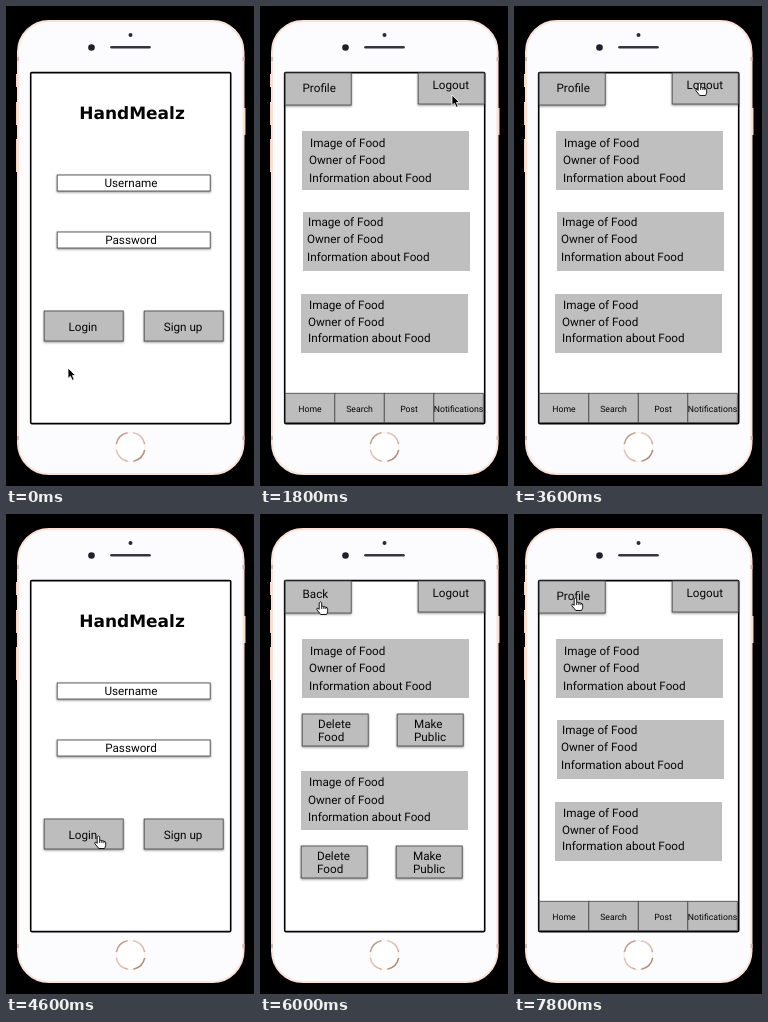
An HTML page for the animation above (8000 ms loop, 248 by 480 pixels).

```html
<!DOCTYPE html>
<html lang="en">
<head>
<meta charset="utf-8">
<title>Food sharing prototype</title>
<style>
  html, body { margin: 0; width: 100%; height: 100%; overflow: hidden; background: #000; }
  svg { display: block; width: 100%; height: 100%; }
  text { font: 11.7px Roboto, sans-serif; fill: #050505; text-rendering: geometricPrecision; }
  .title { font: bold 17px "DejaVu Sans", sans-serif; }
  .nav { font-size: 8.7px; }
  .middle { text-anchor: middle; }
  .raised { stroke: #505050; stroke-width: .9; filter: drop-shadow(0 1px .8px rgba(0, 0, 0, .45)); }
</style>
</head>
<body>
<svg viewBox="0 0 248 480">
  <defs>
    <linearGradient id="ring" x1="0" y1="0" x2="1" y2="1">
      <stop offset="0" stop-color="#a87c68"/>
      <stop offset=".35" stop-color="#e2c6ba"/>
      <stop offset=".6" stop-color="#dcbcae"/>
      <stop offset="1" stop-color="#94694f"/>
    </linearGradient>
  </defs>
  <rect width="248" height="480"/>

  <path d="M11 68v13M11 96v23M11 133v33M238.500 102v27" stroke="#f3d3c7" stroke-width="2"/>
  <rect x="12" y="15" width="225.500" height="453" rx="31" fill="#fcfbfd" stroke="#fbe2d8" stroke-width="2"/>
  <path d="M12 51v4M237.500 51v4M12 430v4M237.500 430v4" stroke="#d9b9ac" stroke-width="2"/>
  <circle cx="124.500" cy="29" r="2" fill="#2c2930"/>
  <circle cx="85.500" cy="41.500" r="3.300" fill="#20202c"/>
  <path d="M105.500 41.300h38" stroke="#37343a" stroke-width="2.600" stroke-linecap="round"/>
  <circle cx="124.500" cy="441" r="14.500" fill="#fff" stroke="#f6efec"/>
  <circle cx="124.500" cy="441" r="14.500" fill="none" stroke="url(#ring)" stroke-width="1.600"
    pathLength="360" stroke-dasharray="66 24" stroke-dashoffset="-12"/>
  <rect x="24.700" y="66.600" width="200" height="351" fill="#fff" stroke="#000" stroke-width="1.600" rx="1"/>

  <g id="login"></g>
  <g id="feed"></g>
  <g id="profile"></g>

  <g id="cursor">
    <path id="arrow" d="M0 0V10.500L2.400 8.300L4.300 12.300L6.200 11.400L4.400 7.500H7.600Z" fill="#000" stroke="#fff" stroke-width=".8"/>
    <path id="hand" d="M-1.300 .8Q0 -.8 1.200 .8V4.500Q2.400 3.600 3.400 4.900Q4.600 4.200 5.400 5.400Q7 5 7.200 6.800V9.200Q7 11 6 12.500H.2Q-1.500 10 -3.600 7.800Q-4.200 6.200 -2.600 6.200L-1.300 7.400ZM1.200 4.500V7M3.400 5V7M5.400 5.500V7.200" fill="#fff" stroke="#000" stroke-width=".9" stroke-linejoin="round"/>
  </g>
</svg>
<script>
const byId = id => document.getElementById(id);

const box = (x, y, w, h, fill, extra = '') =>
  `<rect x="${x}" y="${y}" width="${w}" height="${h}" fill="${fill}" ${extra}/>`;
const label = (x, midY, words, style = '') =>
  `<text x="${x}" y="${midY + 4}" class="${style}">${words}</text>`;
const raised = (x, y, w, h, fill) =>
  box(x + .2, y, w - 1, h - 1, fill, 'class="raised"');

const field = (y, words) => raised(51, y, 154, 17, '#fff') + label(125, y + 8, words, 'middle');
const button = (x, y, w, h, lines, textX, textY) =>
  raised(x, y, w, h, '#bdbdbd') +
  lines.map((line, i) => label(textX, textY + 13 * i, line)).join('');
const card = (x, y, textX, rows) =>
  box(x, y, 167, 59, '#bfbfbf') +
  ['Image of Food', 'Owner of Food', 'Information about Food']
    .map((line, i) => label(textX + (i ? 0 : 1), rows[i], line)).join('');
const actions = (x, y) =>
  button(x, y, 67, 33, ['Delete', 'Food'], x + 16, y + 9.5) +
  button(x + 95, y, 67, 33, ['Make', 'Public'], x + 112, y + 9.5);

const topBar = (words, textY) =>
  button(25, 67, 67, 33, [words], 42.5, textY) +
  button(158, 67, 67, 32, ['Logout'], 172.5, 79);
const firstCard = card(42, 125, 49, [136.5, 154, 171.5]);
const navBar = ['Home', 'Search', 'Post', 'Notifications'].map((words, i) => {
  const x = 25 + i * 49.5;
  return box(x + .3, 387.3, 49.5, 29.3, '#bdbdbd', 'stroke="#505050" stroke-width=".9"') +
    label(x + 25, 401.5, words, 'nav middle');
}).join('');

byId('login').innerHTML =
  label(126, 109, 'HandMealz', 'title middle') +
  field(169, 'Username') + field(226, 'Password') +
  button(38, 305, 80, 31, ['Login'], 62.5, 320.5) +
  button(138, 305, 80, 31, ['Sign up'], 157.7, 320.5);

byId('feed').innerHTML =
  topBar('Profile', 82) + firstCard +
  card(43, 206, 47, [215.5, 233, 251]) +
  card(41, 288, 48, [299, 315.5, 331.5]) + navBar;

byId('profile').innerHTML =
  topBar('Back', 80) + firstCard + actions(42, 200) +
  card(41, 257, 48, [268, 285.5, 303]) + actions(41, 332);

const LOOP = 8000, STEP = 200;
const screens = [
  [0, 'login'], [1000, 'feed'], [2200, 'login'], [3000, 'feed'],
  [3800, 'login'], [5000, 'feed'], [5800, 'profile'], [6400, 'feed']
];
// time, x, y, pointer shape until the next key
const pointer = [
  [0, 62, 362, 'arrow'], [200, 62, 362, 'arrow'], [600, 80, 318, 'hand'],
  [1000, 80, 318, 'arrow'], [1800, 192, 89, 'arrow'], [2000, 192, 89, 'hand'],
  [2200, 192, 89, 'arrow'], [2800, 183.5, 315.5, 'hand'], [3000, 183.5, 315.5, 'arrow'],
  [3600, 185.5, 77, 'hand'], [3800, 185.5, 77, 'arrow'], [4600, 92.5, 322, 'hand'],
  [5000, 92.5, 322, 'arrow'], [5600, 60.5, 88, 'hand'], [6400, 60.5, 88, 'hand'],
  [7800, 61.5, 84, 'hand'], [8000, 61.5, 84, 'hand']
];
const ease = p => p * p * (3 - 2 * p);
const show = (id, visible) => byId(id).style.display = visible ? '' : 'none';

function draw(now) {
  let t = Math.floor(now % LOOP / STEP) * STEP;
  if (t === 4800) t = 4600; // the pointer rests one extra step here
  const screen = screens.filter(s => s[0] <= t).pop()[1];
  for (const id of ['login', 'feed', 'profile']) show(id, id === screen);

  const next = pointer.findIndex(k => k[0] > t);
  const [t0, x0, y0, shape] = pointer[next - 1];
  const [t1, x1, y1] = pointer[next];
  const p = ease((t - t0) / (t1 - t0));
  byId('cursor').setAttribute('transform', `translate(${x0 + (x1 - x0) * p} ${y0 + (y1 - y0) * p})`);
  for (const id of ['arrow', 'hand']) show(id, id === shape);
}

const start = performance.now();
function tick() {
  draw(performance.now() - start);
  requestAnimationFrame(tick);
}
tick();
</script>
</body>
</html>
```
